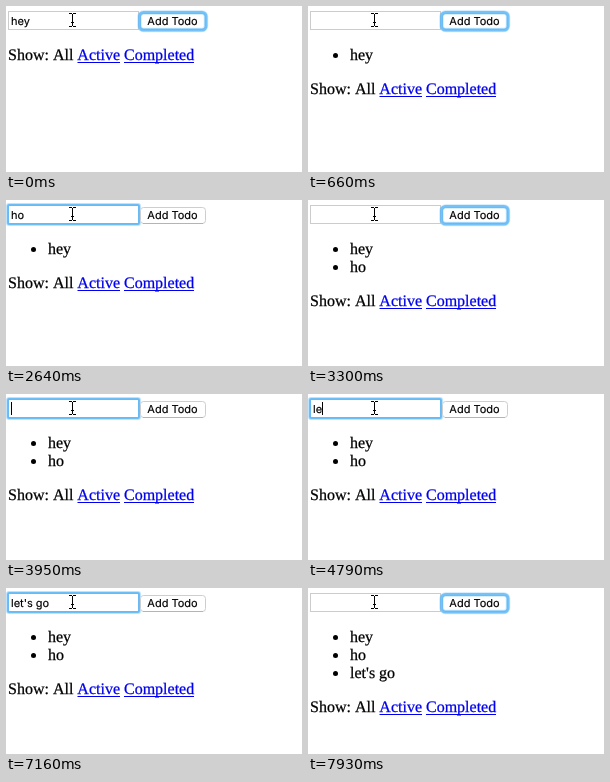
An HTML page for the animation above (8 s loop, 296 by 166 pixels).

```html
<!DOCTYPE html>
<html lang="en">
<head>
<meta charset="utf-8">
<title>Todo list</title>
<style>
  html, body { margin: 0; height: 100%; overflow: hidden; background: #fff; }
  svg { display: block; width: 296px; height: 166px; }
  text {
    font: 16px "Liberation Serif", serif; font-kerning: none; white-space: pre;
    text-rendering: geometricPrecision; stroke: #000; stroke-width: .25px;
  }
  .ui { font: 11px Inter, sans-serif; stroke-width: .15px; }
  .link { fill: #00e; stroke: #00e; }
  .ring rect { fill: none; stroke: #5fb8f8; }
</style>
</head>
<body>
<svg viewBox="0 0 296 166">
  <rect x="2.5" y="5.5" width="130" height="18" fill="#fff" stroke="#ccc"/>
  <g id="inputRing" class="ring">
    <rect x="1.5" y="4.5" width="132" height="20" rx="1.5" stroke-width="3" opacity=".4"/>
    <rect x="2" y="5" width="131" height="19" rx="1" stroke-width="2" opacity=".85"/>
  </g>
  <rect x="134.5" y="7.5" width="65" height="16" rx="3" fill="#fff" stroke="#cecece"/>
  <path d="M137 23.5H197" stroke="#b4b4b4"/>
  <g id="buttonRing" class="ring">
    <rect x="133.5" y="6.5" width="66.5" height="17.5" rx="4" stroke-width="4.5" opacity=".3"/>
    <rect x="133.5" y="6.5" width="66.5" height="17.5" rx="4" stroke-width="3" opacity=".8"/>
  </g>
  <text class="ui" x="166.5" y="19" text-anchor="middle">Add Todo</text>
  <text class="ui" id="field" x="5" y="19"></text>
  <rect id="caret" y="8" width="1" height="13"/>
  <path d="M63 7.5h3m1 0h3M66.5 8v12M63 20.5h3m1 0h3M65 16.5h3" fill="none" stroke="#000"/>
  <g id="list"></g>
  <g id="filters">
    <text x="2">Show: All <tspan class="link">Active</tspan> <tspan class="link">Completed</tspan></text>
    <path class="link" d="M71.5 2.5H114M118 2.5H188"/>
  </g>
</svg>
<script>
const LOOP = 8000;
const $ = id => document.getElementById(id);

// [time, field text, caret x]; null hides the caret
const typing = [
  [0, "hey", null], [660, "", null],
  [1380, "", 5], [1920, "", null], [2010, "h", 11], [2100, "ho", 18], [2640, "ho", null],
  [3300, "", null], [3950, "", 5], [4430, "", null],
  [4610, "l", 8], [4790, "le", 14], [4960, "let", 18], [5440, "let", null],
  [5670, "let'", 21], [5850, "let's", 27], [6030, "let's ", 30], [6500, "let's ", null],
  [6590, "let's g", 37], [6680, "let's go", 43], [7160, "let's go", null],
  [7930, "", null]
];
const inputFocus = [[1380, 2820], [3950, 7450]];
const todos = [[660, "hey"], [3300, "ho"], [7930, "let's go"]];

const show = (el, on) => el.setAttribute("visibility", on ? "visible" : "hidden");

const items = todos.map(([time, label], i) => {
  const y = 54 + 18 * i;
  $("list").insertAdjacentHTML("beforeend",
    `<g><circle cx="27.5" cy="${y - 4.5}" r="2.5"/><text x="42" y="${y}">${label}</text></g>`);
  return { time, el: $("list").lastElementChild };
});

function draw(t) {
  const [, value, caretX] = typing.findLast(([time]) => time <= t);
  $("field").textContent = value;
  show($("caret"), caretX !== null);
  if (caretX !== null) $("caret").setAttribute("x", caretX);

  const focused = inputFocus.some(([from, to]) => t >= from && t < to);
  show($("inputRing"), focused);
  show($("buttonRing"), !focused);

  items.forEach(({ time, el }) => show(el, t >= time));
  const count = items.filter(({ time }) => t >= time).length;
  $("filters").setAttribute("transform", `translate(0 ${count ? 70 + 18 * count : 54})`);
}

function tick() {
  draw(performance.now() % LOOP);
  requestAnimationFrame(tick);
}
tick();
</script>
</body>
</html>
```
